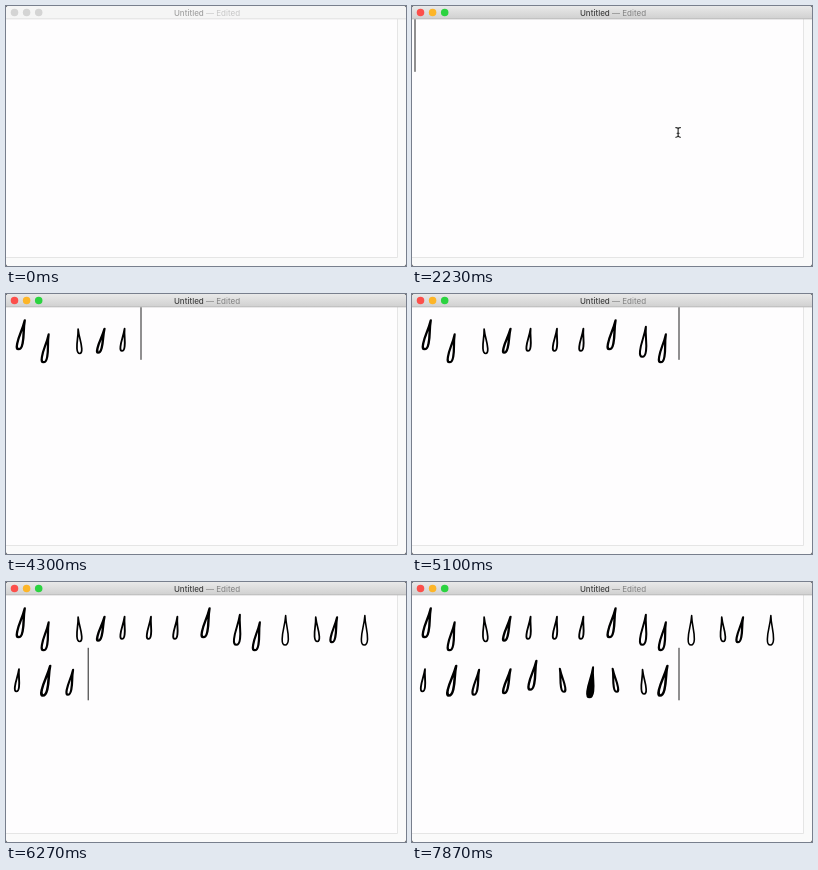
An HTML page that plays this animation: 400 by 260 pixels, repeating every 8000 ms.

```html
<!DOCTYPE html>
<html lang="en">
<head>
<meta charset="utf-8">
<title>Typing drops</title>
<style>
  html, body { margin: 0; width: 100%; height: 100%; overflow: hidden; background: #fff; }
  svg { display: block; width: 100vw; height: 100vh; }
  text { font: 8px Inter, "Open Sans", sans-serif; }
  #name { font-weight: 500; }
</style>
</head>
<body>
<svg viewBox="0 0 400 260">
  <defs>
    <linearGradient id="bar" x1="0" y1="0" x2="0" y2="1">
      <stop offset="0" stop-color="#e9e9e9"/>
      <stop offset="1" stop-color="#d0d0d0"/>
    </linearGradient>
    <clipPath id="frame"><rect width="400" height="260" rx="2.6"/></clipPath>
    <path id="beam" d="M-2.3 -4.8Q0 -4.8 0 -3.2Q0 -4.8 2.3 -4.8M0 -3.2V3.2M-2.3 4.8Q0 4.8 0 3.2Q0 4.8 2.3 4.8M-1 .9H1"/>
  </defs>
  <rect width="400" height="260" fill="#4a4a4a"/>
  <g clip-path="url(#frame)">
    <rect width="400" height="260" fill="#fafafa"/>
    <rect y="13" width="391" height="238" fill="#fefdfe"/>
    <path d="M391.5 13V251.5H0" fill="none" stroke="#e5e5e5"/>
    <rect id="title" width="400" height="13"/>
    <rect id="rule" y="12.5" width="400" height="0.8"/>
    <g id="lights"></g>
    <text x="201" y="9.7" text-anchor="middle"><tspan id="name">Untitled</tspan><tspan id="state"> — Edited</tspan></text>
  </g>
  <g id="drops" stroke="#000" stroke-linejoin="round"></g>
  <rect id="caret" width="1" height="52.5" fill="#222"/>
  <g id="mouse" fill="none" stroke-linecap="round">
    <use href="#beam" stroke="#fff" stroke-width="2.2"/>
    <use href="#beam" stroke="#222" stroke-width="1.1"/>
  </g>
</svg>
<script>
const LOOP = 8000, ACTIVE = 1600, FOCUS = 2230, BLINK = 570;
const LEFT = 2.5, TOP = 13.3, CELL = 26.4, LINE = 52.5, PER_LINE = 14;
const $ = id => document.getElementById(id);

// A small alphabet of drops; a capital letter is filled in.
const alphabet = {
  a: { shift: 0, top: 12, lean: -6, height: 31 },
  b: { shift: -2, top: 26, lean: -5, height: 30 },
  c: { shift: 4.4, top: 21, lean: 1.5, height: 26 },
  d: { shift: 0.5, top: 20.5, lean: -6, height: 26 },
  e: { shift: -4, top: 20.5, lean: -2.5, height: 24 },
  f: { shift: 5.2, top: 18.5, lean: -3.5, height: 32 },
  g: { shift: -0.3, top: 19.5, lean: -0.5, height: 31 },
  h: { shift: -4, top: 21, lean: -5, height: 27 },
  j: { shift: -1.5, top: 17, lean: -7, height: 32 },
  k: { shift: 2.2, top: 20, lean: 4, height: 25 }
};
const message = "abcdeeeafbgchgejhdakFkcj";

// Evenly typed runs of letters.
const run = (start, step, count) => Array.from({ length: count }, (_, i) => start + i * step);
const keys = [
  ...run(2930, 135, 3), ...run(3930, 200, 5), ...run(4870, 192, 6),
  ...run(5950, 160, 5), ...run(7070, 153, 4), 7870
];

function add(parent, tag, attrs) {
  const el = document.createElementNS("http://www.w3.org/2000/svg", tag);
  for (const key in attrs) el.setAttribute(key, attrs[key]);
  return parent.appendChild(el);
}

function place(i, row) {
  return [LEFT + (i - row * PER_LINE) * CELL, TOP + row * LINE];
}

// Narrow neck, round bulb; steeper drops get a heavier pen.
function makeDrop(letter, i) {
  const { shift, top, lean, height } = alphabet[letter.toLowerCase()];
  const [x, y] = place(i, Math.floor(i / PER_LINE));
  const pen = 1.5 + 0.15 * Math.abs(lean);
  const len = height - pen, h = (height * 0.25 - pen) / 2;
  const side = len * 0.8, low = len * 1.07;
  const tip = x + CELL / 2 + shift - lean / 2;
  return add($("drops"), "path", {
    d: `M0 0C${-h * 0.15} ${len * 0.35} ${-h} ${len * 0.5} ${-h} ${side}` +
       `C${-h} ${low} ${h} ${low} ${h} ${side}` +
       `C${h} ${len * 0.5} ${h * 0.15} ${len * 0.35} 0 0Z`,
    transform: `matrix(1 0 ${lean / len} 1 ${tip} ${y + top + pen / 2})`,
    "stroke-width": pen,
    fill: letter < "a" ? "#000" : "none"
  });
}

const drops = [...message].map(makeDrop);
const colors = ["#fc4f4b", "#fdb528", "#2bd340"];
const lights = colors.map((_, i) => add($("lights"), "circle", { cx: 8.5 + i * 12.1, cy: 6.6, r: 3.75 }));

const show = (el, on) => el.setAttribute("visibility", on ? "visible" : "hidden");
const fill = (el, color) => el.setAttribute("fill", color);
const part = (t, a, b) => Math.min(1, Math.max(0, (t - a) / (b - a)));

function mouseAt(t) {
  if (t < FOCUS) {
    const left = (1 - part(t, 1310, 1570)) ** 2;
    return [251.5 + 145 * left, 134.5 + 56 * left];
  }
  const k = part(t, FOCUS, 2300);
  return [264.5 + 113 * k, 127 - 42 * k];
}

function drawWindow(active) {
  fill($("title"), active ? "url(#bar)" : "#f5f5f5");
  fill($("rule"), active ? "#b4b4b4" : "#dadada");
  fill($("name"), active ? "#404040" : "#a2a2a2");
  fill($("state"), active ? "#808080" : "#c6c6c6");
  lights.forEach((el, i) => fill(el, active ? colors[i] : "#d4d4d4"));
}

function render(t) {
  drawWindow(t >= ACTIVE);
  const count = keys.filter(k => k <= t).length;
  drops.forEach((el, i) => show(el, i < count));

  // The caret goes dark when no key follows in time.
  const last = count ? keys[count - 1] : FOCUS;
  const [cx, cy] = place(count, count > PER_LINE ? 1 : 0);
  $("caret").setAttribute("x", cx);
  $("caret").setAttribute("y", cy);
  show($("caret"), t >= last && t < last + BLINK);

  const [x, y] = mouseAt(t);
  $("mouse").setAttribute("transform", `translate(${x} ${y})`);
  show($("mouse"), t >= 1330 && t < 2330);
}

const start = performance.now();
function tick() {
  render((performance.now() - start) % LOOP);
  requestAnimationFrame(tick);
}
tick();
</script>
</body>
</html>
```
